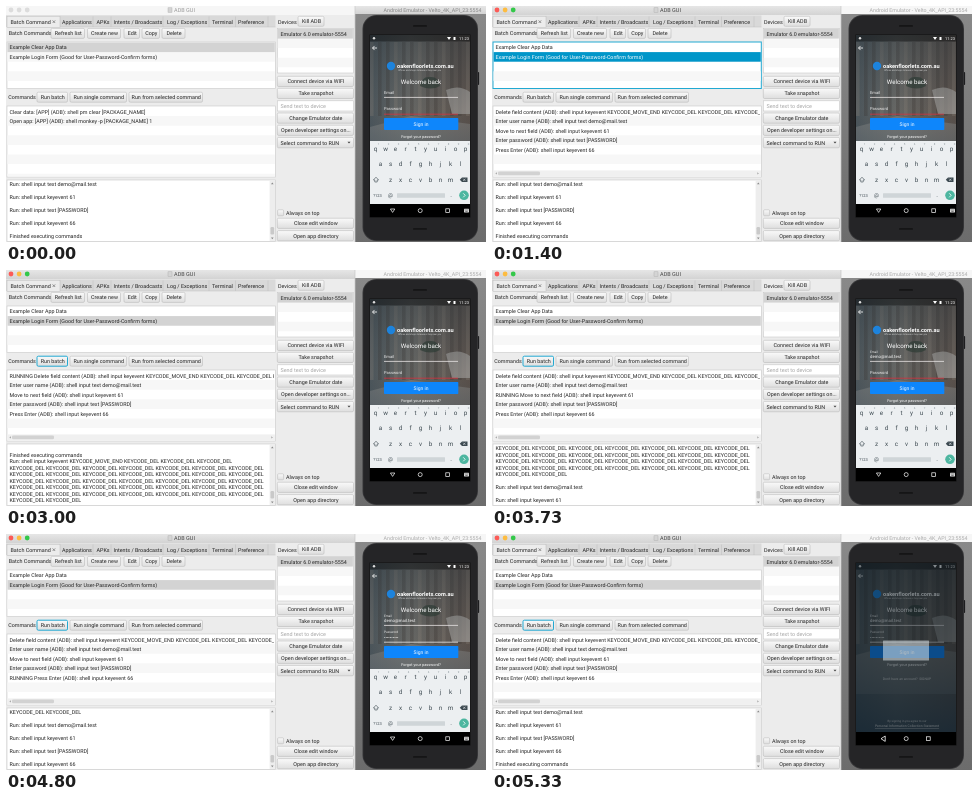
Recreate the animation shown at these times as an HTML page. Size 480 px wide and 236 px high, loop 5.39 s.

```html
<!DOCTYPE html>
<html lang="en">
<head>
<meta charset="utf-8">
<title>Batch commands</title>
<style>
html, body { margin: 0; width: 100%; height: 100%; overflow: hidden; background: #fff; }
svg { display: block; width: 480px; height: 236px; }
text { font-family: Roboto, "Liberation Sans", sans-serif; text-rendering: geometricPrecision; white-space: pre; }
</style>
</head>
<body>
<svg id="stage" viewBox="0 0 480 236">
  <defs>
    <linearGradient id="bar" x2="0" y2="1"><stop stop-color="#e6e6e6"/><stop offset="1" stop-color="#d3d3d3"/></linearGradient>
    <linearGradient id="button" x2="0" y2="1"><stop stop-color="#fafafa"/><stop offset="1" stop-color="#dedede"/></linearGradient>
    <linearGradient id="desk" x2="0" y2="1"><stop stop-color="#8a8a8a"/><stop offset="1" stop-color="#6c6c6c"/></linearGradient>
    <linearGradient id="room"><stop stop-color="#4d565b"/><stop offset=".4" stop-color="#686865"/><stop offset="1" stop-color="#5b5049"/></linearGradient>
    <linearGradient id="floor" x2="0" y2="1"><stop stop-color="#26323b" stop-opacity=".4"/><stop offset=".45" stop-color="#3b4a54" stop-opacity=".05"/><stop offset="1" stop-color="#263c4e" stop-opacity=".75"/></linearGradient>
    <clipPath id="commandClip"><rect x="2" y="101" width="266" height="62"/></clipPath>
    <clipPath id="logClip"><rect x="2" y="175" width="261" height="60"/></clipPath>
    <clipPath id="screenClip"><rect x="364" y="29" width="100" height="182"/></clipPath>
  </defs>
</svg>
<script>
const LOOP = 5390;
const SELECT_AT = 400, HOVER_AT = 1900, RUN_AT = 2600, STEP = 530;
const SUBMIT_AT = 4930;
const INK = '#222', BLUE = '#0096c9', EDGE = '#bdbdbd', IDLE_BAR = '#f6f6f6';
const LIGHTS = ['#fc5b57', '#fdbc40', '#34c84a'];
const EMAIL = 'demo@mail.test';
const stage = document.getElementById('stage');

function add(parent, tag, attrs, content) {
  const node = document.createElementNS('http://www.w3.org/2000/svg', tag);
  for (const key in attrs) node.setAttribute(key, attrs[key]);
  if (content !== undefined) node.textContent = content;
  return parent.appendChild(node);
}
const group = (parent, attrs = {}) => add(parent, 'g', attrs);
const rect = (parent, x, y, width, height, fill, more = {}) =>
  add(parent, 'rect', { x, y, width, height, fill, ...more });
const circle = (parent, cx, cy, r, fill, more = {}) => add(parent, 'circle', { cx, cy, r, fill, ...more });
const path = (parent, d, stroke, width = 0.7, fill = 'none') =>
  add(parent, 'path', { d, stroke, fill, 'stroke-width': width });
const label = (parent, x, y, content, size = 5.4, fill = INK, more = {}) =>
  add(parent, 'text', { x, y, 'font-size': size, fill, ...more }, content);
const centered = (parent, x, y, content, size, fill, more) =>
  label(parent, x, y, content, size, fill, { 'text-anchor': 'middle', ...more });
const show = (node, on) => node.setAttribute('display', on ? 'inline' : 'none');
const clamp = v => Math.max(0, Math.min(1, v));

function button(x, y, width, height, content) {
  const face = rect(stage, x, y, width, height, 'url(#button)', { rx: 1.3, stroke: EDGE, 'stroke-width': 0.6 });
  if (content) centered(stage, x + width / 2 + 0.5, y + height / 2 + 1.9, content);
  return face;
}
const panel = (x, y, width, height) =>
  rect(stage, x, y, width, height, '#fff', { stroke: '#c8c8c8', 'stroke-width': 0.6 });

function listPanel(x, y, width, height) {
  const frame = panel(x, y, width, height);
  const rowHeight = 9.6;
  for (let top = y + 0.5 + rowHeight; top < y + height - 1; top += 2 * rowHeight)
    rect(stage, x + 0.5, top, width - 1, Math.min(rowHeight, y + height - 0.5 - top), '#f7f7f7');
  return frame;
}

// Tool window
rect(stage, 0, 0, 349, 236, '#ececec');
const toolBar = rect(stage, 0, 0, 349, 9, IDLE_BAR);
const lights = LIGHTS.map((color, i) => circle(stage, 5 + i * 8.1, 4, 2.4, color));
rect(stage, 162, 1.8, 4, 4.6, '#d4d4d4', { stroke: '#a8a8a8', 'stroke-width': 0.4 });
const toolTitle = centered(stage, 178.5, 6, 'ADB GUI', 5.5);

rect(stage, 0, 9.5, 269.5, 11.5, '#d9d9d9');
rect(stage, 1, 10.2, 53, 11.3, '#ececec', { stroke: EDGE, 'stroke-width': 0.5 });
label(stage, 4.5, 17.8, 'Batch Command');
path(stage, 'M46.6 14.4l2.6 2.6m0-2.6l-2.6 2.6', '#555', 0.6);
[[56, 'Applications', 87], [90.5, 'APKs', 105], [107.5, 'Intents / Broadcasts', 157], [161, 'Log / Exceptions', 203],
 [206, 'Terminal', 229.5], [232, 'Preference', 262]].forEach(([x, name, end]) => {
  label(stage, x, 17.8, name);
  path(stage, `M${end} 10.5V21`, EDGE, 0.5);
});
path(stage, 'M54 21H269.5', EDGE, 0.5);

label(stage, 2.7, 29.3, 'Batch Commands');
[[45, 33.5, 'Refresh list'], [81.5, 33, 'Create new'], [118, 15.5, 'Edit'], [136, 17.5, 'Copy'], [156, 23, 'Delete']]
  .forEach(([x, width, name]) => button(x, 22.4, width, 10, name));

const batchPanel = listPanel(1, 36, 268.3, 46.5);
const selection = rect(stage, 1.5, 36.5, 267.3, 9.6, '#d3d3d3');
const batchRows = ['Example Clear App Data', 'Example Login Form (Good for User-Password-Confirm forms)']
  .map((name, i) => label(stage, 3.5, 43.4 + i * 9.6, name, 5.35));

label(stage, 2.2, 93.3, 'Commands', 5.35);
const runBatch = button(31, 86.2, 30.5, 10, 'Run batch');
const runSingle = button(64, 86.2, 56.5, 10, 'Run single command');
button(123, 86.2, 73.5, 10, 'Run from selected command');

listPanel(1, 100, 268.3, 71);
const commandArea = group(stage, { 'clip-path': 'url(#commandClip)' });
const commandRows = [0, 1, 2, 3, 4].map(i => label(commandArea, 3.5, 107.9 + i * 9.5, '', 5.35));
const commandScroll = group(stage);
rect(commandScroll, 1.4, 164.4, 267.5, 6.2, '#f0f0f0');
rect(commandScroll, 6, 165.6, 42, 3.6, '#d2d2d2', { rx: 1.2 });
path(commandScroll, 'M4.8 166.2L3.4 167.4L4.8 168.6ZM265.4 166.2L266.8 167.4L265.4 168.6Z', 'none', 0, '#999');

panel(1, 174, 268.3, 61.3);
const logArea = group(stage, { 'clip-path': 'url(#logClip)' });
const logRows = [...Array(9)].map((_, i) => label(logArea, 3.5, 180 + i * 6.5, '', 5.37));
rect(stage, 263.6, 174.4, 5.4, 60.5, '#ededed');
rect(stage, 264.5, 221, 3.6, 7.5, '#c9c9c9', { rx: 1.2 });
path(stage, 'M265 178.2L266.3 176.6L267.6 178.2ZM265 231.6L266.3 233.2L267.6 231.6Z', 'none', 0, '#888');

// Device column
label(stage, 272, 17.6, 'Devices');
button(292, 10.3, 26, 10, 'Kill ADB');
listPanel(271.3, 22.4, 76, 44.6);
rect(stage, 271.7, 22.8, 75.2, 9.8, '#d3d3d3');
label(stage, 274.5, 29.5, 'Emulator 6.0 emulator-5554', 5.35);
[[70.3, 'Connect device via WIFI'], [82.3, 'Take snapshot'], [107, 'Change Emulator date'],
 [119.2, 'Open developer settings on...'], [212.2, 'Close edit window'], [224.6, 'Open app directory']]
  .forEach(([y, name]) => button(271.3, y, 76.2, 10.2, name));
panel(271.3, 94.8, 76.2, 10.2);
label(stage, 274.5, 101.8, 'Send text to device', 5.4, '#a5a5a5');
button(271.3, 131.4, 76.2, 10.4);
label(stage, 274.5, 138.5, 'Select command to RUN');
path(stage, 'M341.5 135.8h3l-1.5 1.8z', 'none', 0, '#444');
rect(stage, 271.6, 203.8, 6, 6, 'url(#button)', { rx: 1, stroke: EDGE, 'stroke-width': 0.6 });
label(stage, 280, 208.8, 'Always on top');

// Phone
rect(stage, 349, 0, 131, 236, 'url(#desk)');
const phoneBar = rect(stage, 349, 0, 131, 8, IDLE_BAR);
path(stage, 'M349 0V236', '#c8c8c8', 0.7);
const phoneTitle = centered(stage, 426.5, 5.6, 'Android Emulator - Velto_4K_API_23:5554', 5.3);
rect(stage, 471.5, 66, 1.6, 13, '#1d1d1f', { rx: 0.8 });
rect(stage, 356.5, 9, 115.5, 226, '#3a3a3c', { rx: 14 });
rect(stage, 357.3, 9.8, 113.9, 224.4, '#252527', { rx: 13.2 });
rect(stage, 407, 19, 14, 1.8, '#151516', { rx: 0.9 });
rect(stage, 407, 222, 14, 1.8, '#151516', { rx: 0.9 });
rect(stage, 363.5, 28.5, 101, 183, '#111');

const screen = group(stage, { 'clip-path': 'url(#screenClip)' });
rect(screen, 364, 29, 100, 169, 'url(#room)');
for (let i = 0; i < 13; i++)
  rect(screen, 364 + i * 8, 36, 3.6, 74, i % 3 ? '#38322f' : '#8b8078', { opacity: 0.3 });
path(screen, 'M364 121L405 110L464 118V160H364Z', 'none', 0, '#8d8d8b').setAttribute('opacity', 0.45);
path(screen, 'M440 84Q453 78 464 86V108H446Z', 'none', 0, '#a9a7a3').setAttribute('opacity', 0.6);
path(screen, 'M414 80Q416 70 424 71Q432 70 434 80Q425 85 414 80Z', 'none', 0, '#2c3b30').setAttribute('opacity', 0.7);
rect(screen, 364, 29, 100, 169, 'url(#floor)');
rect(screen, 364, 29, 100, 6.5, '#000', { opacity: 0.4 });
label(screen, 453, 34, '11:23', 4, '#fff');
path(screen, 'M441 31h4l-2 3zM447.5 31h2v3h-2z', 'none', 0, '#fff');
circle(screen, 368, 32.3, 1.2, '#ddd');
path(screen, 'M371 42H366.6M368.6 39.9L366.5 42L368.6 44.1', '#fff', 0.8);
circle(screen, 385, 60, 4.2, '#1d83dc');
label(screen, 391, 62, 'oakenfloorlets.com.au', 5.6, '#fff', { 'font-weight': 700 });
label(screen, 392, 65.2, 'Offices and shops to lease or buy near you', 2.3, '#ddd');
centered(screen, 415, 78, 'Welcome back', 6.2, '#fff');

function field(name, value, y, lineColor) {
  const title = label(screen, 378, y, name, 4.1, '#eee');
  const entry = label(screen, 378, y + 0.7, value, 4.3, '#fff');
  const line = path(screen, `M378 ${y + 3.8}H452`, lineColor, 0.8);
  return filled => {
    title.setAttribute('y', filled ? y - 5 : y);
    title.setAttribute('font-size', filled ? 3.2 : 4.1);
    show(entry, filled);
    return line;
  };
}
const setEmail = field('Email', EMAIL, 87.6, '#e8e4e4');
const setPassword = field('Password', '••••••••••', 104.4, '#d8323e');
rect(screen, 378, 112, 74.3, 12, '#0e86fb', { rx: 0.7 });
centered(screen, 415, 119.8, 'Sign in', 5, '#fff');
centered(screen, 415, 132, 'Forgot your password?', 3.9, '#fff');
centered(screen, 415, 145.5, "Don't have an account?  SIGNUP", 3.4, '#ddd');
centered(screen, 415, 188.3, 'By signing in you agree to our', 3, '#ccc');
centered(screen, 415, 193, 'Personal Information Collection Statement', 3.4, '#ddd', { 'text-decoration': 'underline' });

const dim = rect(screen, 364, 29, 100, 169, '#08141c');
const dialog = rect(screen, 391, 106.5, 46, 20, '#e9f1f6', { rx: 0.6 });

const keyboard = group(screen);
const KEY = '#3d4a51';
rect(keyboard, 364, 135, 100, 64, '#eceff1');
[['qwertyuiop', 369.5, 144.7], ['asdfghjkl', 374.5, 160.3], ['zxcvbnm', 384.5, 175.6]].forEach(([keys, x, y], row) =>
  [...keys].forEach((key, i) => {
    centered(keyboard, x + i * 10, y, key, 6.3, KEY);
    if (!row) centered(keyboard, x + 3 + i * 10, 139.4, (i + 1) % 10, 2.8, '#8b969b');
  }));
path(keyboard, 'M370 171.2L367.4 174H368.8V176H371.2V174H372.6Z', KEY, 0.6);
path(keyboard, 'M456 171.6H461.5V176H456L453.8 173.8Z', 'none', 0, KEY);
path(keyboard, 'M457.2 172.7l2.2 2.2m0-2.2l-2.2 2.2', '#eceff1', 0.6);
centered(keyboard, 371.5, 190.8, '?123', 4, KEY);
centered(keyboard, 384.5, 191, '@', 5.4, KEY);
rect(keyboard, 391, 187.3, 48, 4.4, '#cfd5d8', { rx: 0.5 });
centered(keyboard, 445, 191, '.', 6.5, KEY);
circle(keyboard, 458, 189.3, 4.8, '#4db6a0');
path(keyboard, 'M457.2 187.3l2 2l-2 2', '#fff', 0.8);

rect(screen, 364, 198, 100, 13, '#000');
const backDown = path(screen, 'M384.4 203H388.8L386.6 206.4Z', '#fff', 0.7);
const backLeft = path(screen, 'M393.2 202L389 204.7L393.2 207.4Z', '#fff', 0.8);
const homeKey = circle(screen, 414.2, 204.6, 2, 'none', { stroke: '#fff', 'stroke-width': 0.7 });
const recentKey = rect(screen, 0, 202.8, 3.7, 3.7, 'none', { stroke: '#fff', 'stroke-width': 0.7 });
const keyIcon = group(screen);
rect(keyIcon, 458, 202.8, 5, 3.6, '#ddd', { rx: 0.4 });
path(keyIcon, 'M458.7 204h3.6M459.3 205.5h2.4', '#222', 0.5);

// Script content
const dels = n => Array(n).fill('KEYCODE_DEL').join(' ');
const clearCommands = [
  'Clear data: [APP] (ADB): shell pm clear [PACKAGE_NAME]',
  'Open app: [APP] (ADB): shell monkey -p [PACKAGE_NAME] 1'
];
const actions = [
  ['Delete field content', 'input keyevent KEYCODE_MOVE_END ' + dels(3)],
  ['Enter user name', 'input text ' + EMAIL],
  ['Move to next field', 'input keyevent 61'],
  ['Enter password', 'input text [PASSWORD]'],
  ['Press Enter', 'input keyevent 66']
];
const loginCommands = actions.map(([name, command], i) =>
  `${name} (ADB): shell ${command}${i ? '' : ' ' + dels(1)}`);
const runLines = actions.map(([, command], i) =>
  ['Run: shell ' + command, ...(i ? [] : [...Array(5).fill(dels(7)), dels(2)])]);
const DONE = 'Finished executing commands';

function logLines(step) {
  if (step < 0) return logLines(actions.length);
  const lines = ['', DONE];
  runLines.slice(0, step + 1).forEach((entry, i) => lines.push(...(i ? [''] : []), ...entry));
  if (step >= actions.length) lines.push('', DONE);
  return lines.slice(-9);
}

function setOutline(node, on, color = EDGE) {
  node.setAttribute('stroke', on ? '#22a9d2' : color);
  node.setAttribute('stroke-width', on ? 1 : 0.6);
}

function setActiveWindow(tool) {
  toolBar.setAttribute('fill', tool ? 'url(#bar)' : IDLE_BAR);
  phoneBar.setAttribute('fill', tool ? IDLE_BAR : 'url(#bar)');
  toolTitle.setAttribute('fill', tool ? '#444' : '#999');
  phoneTitle.setAttribute('fill', tool ? '#aaa' : '#888');
  lights.forEach((light, i) => light.setAttribute('fill', tool ? LIGHTS[i] : '#dcdcdc'));
}

function draw(t) {
  const picked = t >= SELECT_AT;
  const running = t >= RUN_AT;
  const focused = picked && !running;
  const step = running ? Math.min(actions.length, Math.floor((t - RUN_AT) / STEP)) : -1;

  setActiveWindow(picked);
  selection.setAttribute('y', picked ? 46.1 : 36.5);
  selection.setAttribute('fill', focused ? BLUE : '#d3d3d3');
  batchRows[1].setAttribute('fill', focused ? '#fff' : INK);
  setOutline(batchPanel, focused, '#c8c8c8');
  setOutline(runBatch, running);
  runSingle.setAttribute('fill', t >= HOVER_AT && !running ? '#dcdcdc' : 'url(#button)');

  const commands = picked ? loginCommands : clearCommands;
  commandRows.forEach((row, i) => {
    row.textContent = (i === step ? 'RUNNING ' : '') + (commands[i] || '');
  });
  show(commandScroll, picked);
  logLines(step).forEach((line, i) => { logRows[i].textContent = line; });

  setEmail(t >= RUN_AT + STEP * 1.5);
  const hasPassword = t >= RUN_AT + STEP * 3.5;
  setPassword(hasPassword).setAttribute('stroke', hasPassword ? '#e8e4e4' : '#d8323e');
  const submitted = t >= SUBMIT_AT;
  const slide = clamp((t - SUBMIT_AT) / 140);
  keyboard.setAttribute('transform', `translate(0 ${64 * slide * slide})`);
  dim.setAttribute('opacity', 0.5 * clamp((t - SUBMIT_AT - 130) / 200));
  dialog.setAttribute('opacity', 0.5 * clamp((t - SUBMIT_AT - 300) / 90));
  show(backDown, !submitted);
  show(backLeft, submitted);
  recentKey.setAttribute('x', submitted ? 434.5 : 439.8);
  show(keyIcon, !submitted);
}

const start = performance.now();
function tick() {
  draw((performance.now() - start) % LOOP);
  requestAnimationFrame(tick);
}
tick();
</script>
</body>
</html>
```
